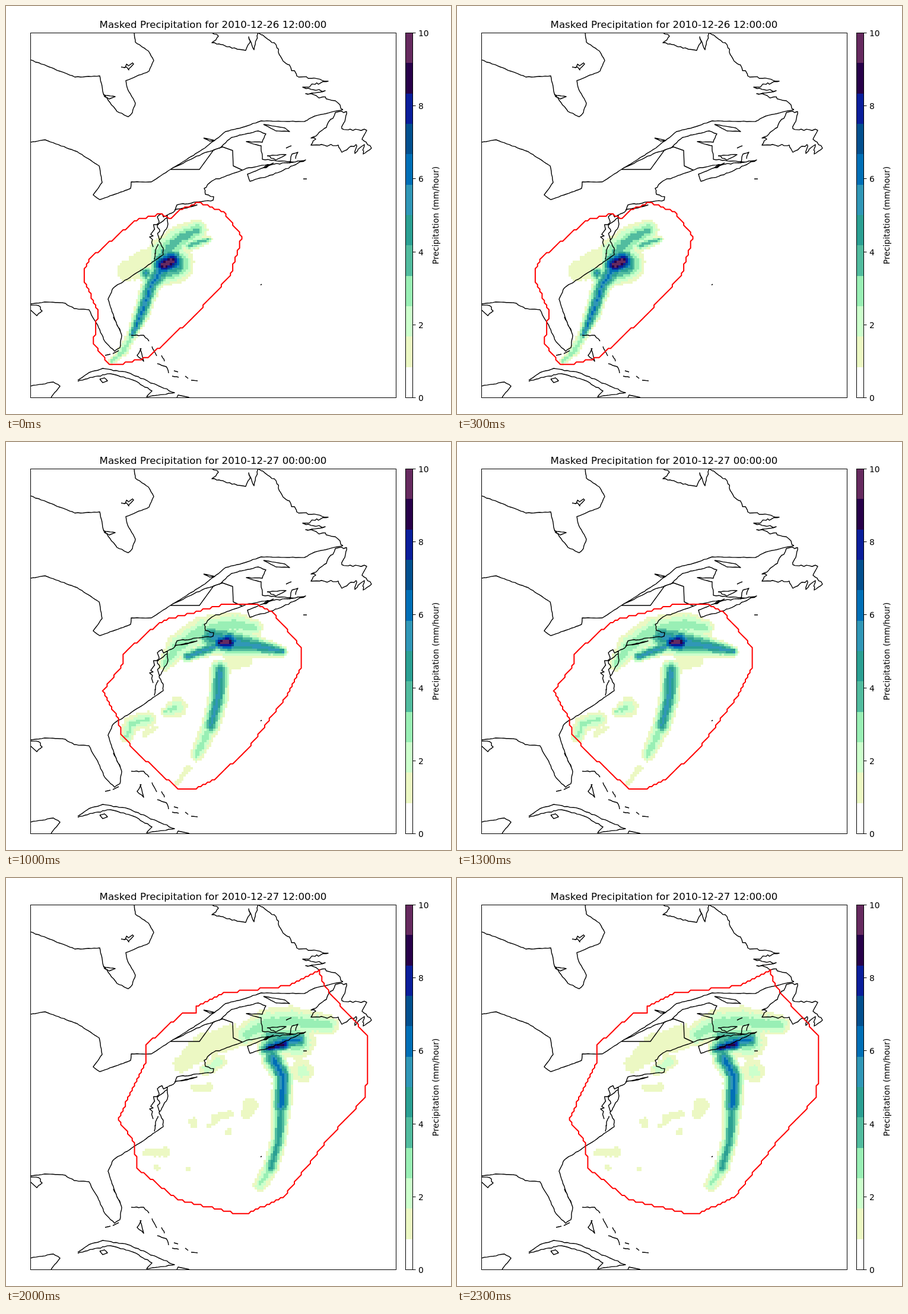
An HTML page with a canvas that plays this animation: 750 px wide and 689 px high, repeating every 2.5 s.

```html
<!DOCTYPE html>
<html lang="en">
<head>
<meta charset="utf-8">
<title>Masked Precipitation</title>
<style>
  html, body { margin: 0; width: 100%; height: 100%; overflow: hidden; background: #fff; }
  canvas, svg { position: absolute; left: 0; top: 0; }
  text { font: 13.89px "DejaVu Sans", sans-serif; }
  #title { font-size: 16.67px; text-anchor: middle; }
  path { fill: none; stroke: #000; stroke-linejoin: round; }
</style>
</head>
<body>
<canvas id="rain" width="750" height="689"></canvas>
<svg width="750" height="689" viewBox="0 0 750 689">
  <clipPath id="map"><rect x="41" y="45" width="617" height="617"/></clipPath>
  <path id="coast" stroke-width="1.4" clip-path="url(#map)"/>
  <path id="ring" style="stroke: #f00; stroke-width: 2"/>
  <rect x="41.5" y="45.5" width="616" height="616" fill="none" stroke="#000"/>
  <text id="title" x="349" y="37"></text>
  <g id="bar"></g>
  <rect x="673.5" y="45.5" width="12" height="616" fill="none" stroke="#000"/>
  <text transform="translate(728.5 353.5) rotate(-90)" text-anchor="middle">Precipitation (mm/hour)</text>
</svg>
<script>
const $ = id => document.getElementById(id);
const ctx = $('rain').getContext('2d');
const CELL = 3.85, LEFT = 41.4, TOP = 45, STEP = 500;
const COLORS = ['#fff', '#ecf8c3', '#ccffcc', '#99efb5', '#52bc9f', '#2ba093',
  '#3097b7', '#006fb6', '#02508f', '#0a1e9b', '#28004a', '#662a5f'];

const numbers = text => text.split(' ').map(Number);
const groups = (list, size) => Array.from({ length: list.length / size }, (_, i) => list.slice(i * size, i * size + size));
const noise = n => { const s = Math.sin(n * 12.9898) * 43758.5453; return s - Math.floor(s) - .5; };

// Coastlines: a few corners, joined by crinkled lines.
let coastPath = '';
function coast(rough, text) {
  const points = groups(numbers(text), 2);
  const line = [points[0]];
  points.slice(1).forEach(([x, y], i) => {
    const [px, py] = points[i], n = Math.ceil(Math.hypot(x - px, y - py) / 5);
    for (let k = 1; k <= n; k++) {
      const wobble = k < n ? rough * 2 : 0, seed = x + y * 3 + k;
      line.push([px + (x - px) * k / n + wobble * noise(seed), py + (y - py) * k / n + wobble * noise(seed + .5)]);
    }
  });
  coastPath += 'M' + line.join('L');
}
coast(.6, '41 91 73 103 116 120 158 118 164 148 187 178 206 187 213 180 218 164 204 137 202 126 241 110 249 92 240 76 218 61 216 45');
coast(3, '194 103 215 98 207 108 198 104');
coast(.5, '164 150 184 153 174 157 165 152');
coast(1.2, '347 45 358 51 347 62 362 65 390 73 404 75 411 62 409 52 418 74 425 45');
coast(2.2, '426 46 452 62 459 78 467 93 480 104 490 118 543 127 500 137 538 143 505 148 555 160 568 175');
coast(.5, '568 175 520 186 503 195 430 194 398 205 370 212 335 240 300 262 277 276');
coast(.7, '277 276 330 250 360 240 380 222 425 211 438 216 432 230 405 229 430 236 432 259');
coast(1, '432 259 484 264 452 267 407 284 411 296 450 285 505 260 478 265 482 250 492 247 488 258');
coast(1.2, '451 265 434 273 445 268 410 273 350 294 334 308 336 318 350 322 349 328 288 336 285 345 272 353 272 373 258 396');
coast(.3, '434 200 470 206 478 212 455 211 434 200');
coast(1, '440 253 472 251 455 260 440 253');
coast(.5, '472 240 481 236');
coast(.3, '333 223 352 227 343 228 333 223');
coast(.5, '284 344 322 336 305 341 284 344');
coast(1.8, '574 178 555 180 540 205 514 223 522 225 514 235 560 235 566 247 590 234 588 249 604 234 602 250 616 240 600 225 608 210 580 208 566 207 574 178');
coast(0, '501 292 507 292');
coast(0, '429 471 431 470');
coast(0, '277 276 326 276 350 243 365 238 382 244 383 270 398 277');
coast(.4, '41 230 66 226 120 246 146 263 157 270 162 298 147 319 158 327 210 308 211 297 245 297 277 276');
coast(4, '272 353 258 353 250 376 242 390 248 407');
coast(3, '272 357 255 368 258 397');
coast(3, '256 402 252 412 250 428');
coast(.7, '258 397 265 409 265 420 240 437 212 456 181 476 172 495 182 525 195 556 192 577 183 583 167 567 156 543 140 513 115 511 100 502 70 500 41 503');
coast(1.5, '41 505 55 506 61 515 52 523 41 513');
coast(1, '181 525 193 550');
coast(0, '167 590 176 588');
coast(0, '180 587 190 582');
coast(.8, '121 632 140 619 163 612 205 619 284 653 237 660 246 650 215 632 176 621 146 627 121 634');
coast(.5, '158 630 166 628 171 633 163 636 158 630');
coast(.6, '41 642 80 635 91 642 76 661');
coast(0, '288 661 290 657 309 661');
coast(1, '211 556 232 556 241 566');
coast(1, '226 578 232 600 221 590 228 578');
coast(1, '246 575 254 591');
coast(1, '262 590 267 600');
coast(1, '255 604 270 609 274 620');
coast(0, '283 616 290 618');
coast(.5, '280 625 291 627');
coast(.5, '302 625 307 629');
coast(.5, '312 632 323 633');

// A scene is an outline and bands of rain: peak level, then x, y and radius along the band.
const scenes = [];
const scene = (ring, ...bands) => scenes.push({ ring, bands });
scene('132 442 144 425 187 390 218 363 257 352 280 358 292 345 325 332 368 347 397 389 378 455 318 525 241 593 191 605 175 605 147 569 155 515 132 462',
  '6.5 268 438 26 245 470 17 228 520 15 213 554 9', '3 212 556 9 198 582 9 178 600 6',
  '11.9 266 437 24 279 431 24', '6 272 440 32 285 436 32', '6 236 452 14',
  '4 265 418 28 290 395 24 322 378 18', '4 310 404 11 342 394 6', '1 204 448 18 235 435 26');
scene('144 429 152 424 179 383 217 341 265 317 299 311 338 312 372 305 443 340 463 383 439 437 410 500 361 540 318 582 280 605 238 605 205 584 205 556 179 510 144 447',
  '5 312 360 27 347 365 34 328 398 18', '5.6 328 398 18 308 435 14 292 490 14 270 535 13 247 565 9',
  '9 301 389 13 309 379 13', '3.6 256 418 18 272 378 20 305 350 24', '1 370 375 20 392 373 6',
  '1 186 480 8 212 480 6', '1 195 466 3 237 465 4', '1.5 245 567 8 233 590 4', '1 415 366 4');
scene('163 420 197 373 199 360 240 322 268 300 366 274 424 274 448 285 497 348 497 378 470 432 410 515 350 572 315 586 291 586 220 526 193 492 190 468 174 445',
  '3 268 375 12 290 345 22 330 318 24 385 308 22 418 314 16', '6 345 328 28 380 338 28 420 344 20 466 354 9',
  '6 305 362 11 350 346 13', '11.9 362 339 16 375 338 22', '5.8 361 385 18 358 430 18 345 480 16',
  '3 345 480 16 322 528 12', '1 308 550 5 288 576 4', '1 380 372 14 400 365 16',
  '2.6 203 498 11 212 475 14 240 468 14', '2.4 268 456 8 288 448 18', '1 234 492 6 252 484 4');
scene('174 414 190 400 205 362 205 333 237 293 310 246 345 232 400 209 438 209 492 216 555 290 567 327 555 373 490 475 440 537 368 582 314 578 300 555 225 515 201 480 201 457',
  '3 288 350 18 308 320 22 340 298 22 395 272 22 450 268 20 488 288 18', '5 350 300 18 385 293 22 430 288 28 460 312 18',
  '6.8 395 300 22 412 308 24 455 315 18', '7 411 325 14 410 385 17 406 440 16', '4 406 440 15 388 490 12',
  '2.5 388 490 12 375 525 11 362 552 9', '1 362 552 8 350 563 4', '1 455 335 14 470 348 12', '1 490 320 7 510 338 6',
  '1 268 469 7 300 459 7 335 455 5', '1 212 488 8 222 502 9 236 516 5', '1 230 475 7 250 463 4', '1 361 412 6', '1 252 489 4 268 482 4');
scene('190 407 209 363 237 310 237 283 297 228 320 228 322 217 370 193 410 188 480 180 527 155 532 175 547 197 609 265 608 328 605 370 545 440 465 540 406 566 388 566 290 542 220 488 216 446',
  '1 295 315 14 330 285 22 380 268 22', '3 405 265 20 440 246 26 480 242 26 545 248 17', '4 445 265 26 490 275 32',
  '6.5 440 288 18 465 276 24 495 273 18', '10 443 287 13 470 280 15', '7 450 305 20 467 335 19 464 385 18',
  '5 464 385 17 460 440 14 446 490 14', '2.5 446 490 14 428 518 12', '2 500 326 20', '2 338 323 11 358 310 13',
  '1 318 354 6 342 354 7', '1 412 385 13 405 399 9', '1 350 405 6 378 398 6', '1 316 413 9', '1 340 419 4 355 412 4',
  '1 268 463 9 235 464 5', '1 255 489 5', '1 375 428 6', '1 306 490 5');

// Rain strength at a point: full on a band's spine, falling evenly to its rim.
function strength(spine, peak, x, y) {
  let best = 0;
  for (let i = 0; i < Math.max(1, spine.length - 1); i++) {
    const [ax, ay, ar] = spine[i], [bx, by, br] = spine[i + 1] || spine[i];
    const dx = bx - ax, dy = by - ay;
    const t = Math.max(0, Math.min(1, ((x - ax) * dx + (y - ay) * dy) / (dx * dx + dy * dy || 1)));
    const d = Math.hypot(x - ax - dx * t, y - ay - dy * t);
    best = Math.max(best, peak * (1 - d / (ar + (br - ar) * t)));
  }
  return best;
}

function drawRain(bands) {
  const fields = bands.map(text => {
    const [peak, ...rest] = numbers(text);
    return [groups(rest, 3), peak];
  });
  const edge = (start, k) => Math.round(start + k * CELL);
  ctx.clearRect(0, 0, 750, 689);
  for (let r = 0; r < 160; r++) for (let c = 0; c < 160; c++) {
    const x = LEFT + (c + .5) * CELL, y = TOP + (r + .5) * CELL;
    let level = 0;
    for (const [spine, peak] of fields) {
      const v = strength(spine, peak, x, y);
      if (v > 0) level = Math.max(level, Math.ceil(Math.min(peak, v + .4 * noise(c + r * 161))));
    }
    if (!level) continue;
    ctx.fillStyle = COLORS[Math.min(level, 11)];
    const left = edge(LEFT, c), top = edge(TOP, r);
    ctx.fillRect(left, top, edge(LEFT, c + 1) - left, edge(TOP, r + 1) - top);
  }
}

// Walks the outline from cell centre to cell centre.
function ringPath(text) {
  const corners = groups(numbers(text), 2).map(([x, y]) =>
    [Math.round((x - LEFT) / CELL - .5), Math.round((y - TOP) / CELL - .5)]);
  const steps = corners.flatMap((a, j) => {
    const b = corners[(j + 1) % corners.length];
    const n = Math.max(Math.abs(b[0] - a[0]), Math.abs(b[1] - a[1]));
    return Array.from({ length: n }, (_, i) => a.map((v, k) => Math.round(v + (b[k] - v) * i / n)));
  });
  return 'M' + steps.map(([c, r]) => [LEFT + (c + .5) * CELL, TOP + (r + .5) * CELL]).join('L') + 'Z';
}

function show(i) {
  drawRain(scenes[i].bands);
  $('ring').setAttribute('d', ringPath(scenes[i].ring));
  const date = new Date(Date.UTC(2010, 11, 26, 12 + 6 * i)).toISOString();
  $('title').textContent = `Masked Precipitation for ${date.slice(0, 10)} ${date.slice(11, 19)}`;
}

$('coast').setAttribute('d', coastPath);
const barY = i => Math.round(661 - i * 616 / 12);
$('bar').innerHTML = COLORS.map((color, i) =>
  `<rect x="673" y="${barY(i + 1)}" width="13" height="${barY(i) - barY(i + 1)}" fill="${color}"/>`
).join('') + [0, 2, 4, 6, 8, 10].map(v => {
  const y = Math.round(661 - v * 61.6) + .5;
  return `<path d="M686 ${y}h4.5"/><text x="695" y="${y + 5}">${v}</text>`;
}).join('');

let shown = -1;
function tick() {
  const i = Math.floor(performance.now() / STEP) % scenes.length;
  if (i !== shown) show(shown = i);
  requestAnimationFrame(tick);
}
tick();
</script>
</body>
</html>
```
